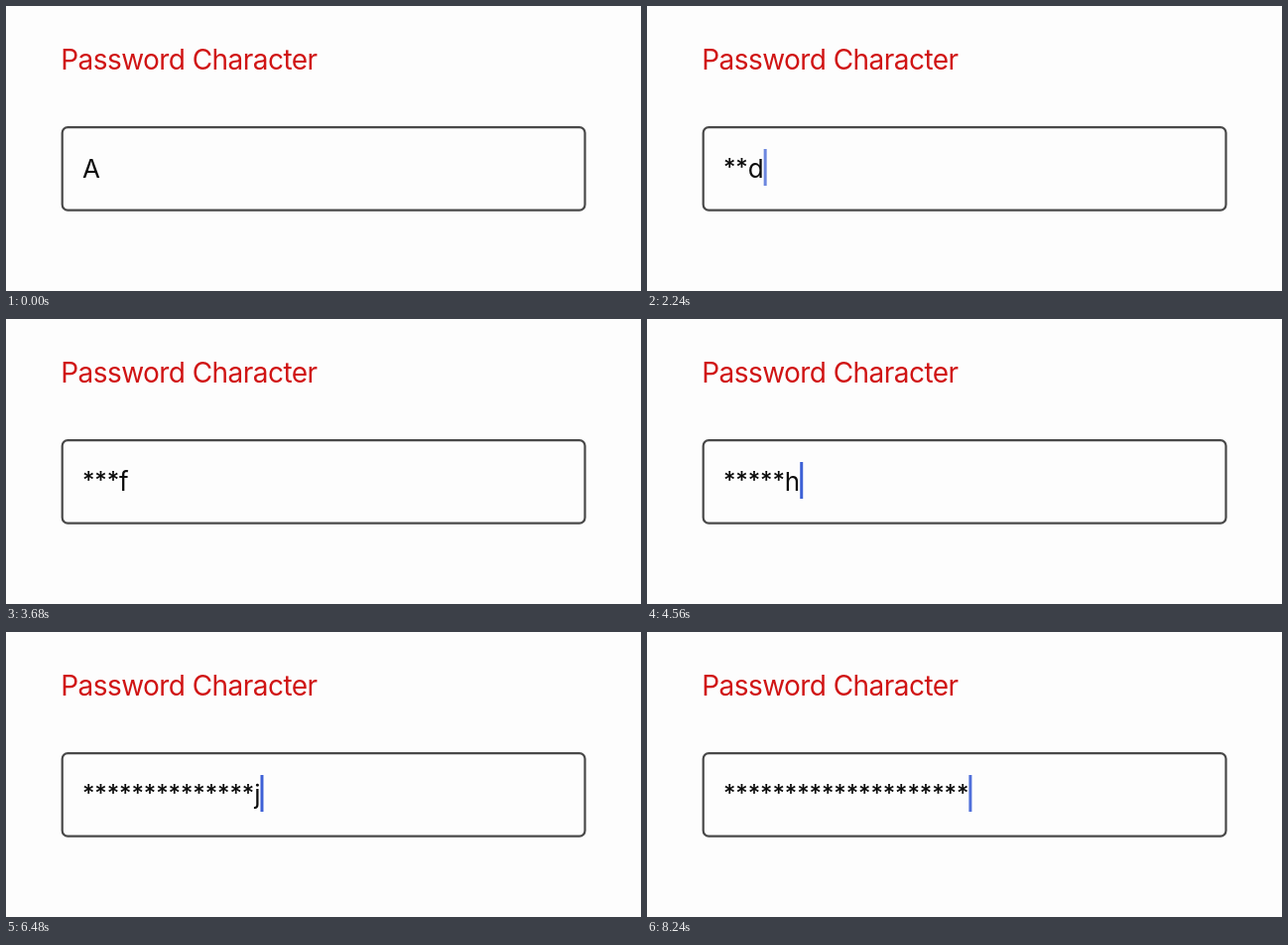
An HTML page with a canvas that plays this animation: 640x287 px, repeating every 8.32 s.

```html
<!DOCTYPE html>
<html lang="en">
<head>
<meta charset="utf-8">
<title>Password field</title>
<style>
  html, body { margin: 0; width: 100%; height: 100%; overflow: hidden; background: #fdfdfd; }
  canvas { display: block; filter: blur(0.6px); }
</style>
</head>
<body>
<canvas id="stage" width="640" height="287"></canvas>
<script>
const ctx = document.getElementById('stage').getContext('2d');
const LOOP = 8320, STEP = 80;
const SANS = 'Inter, Roboto, "Liberation Sans", sans-serif';
const LEFT = 77, PITCH = 12.37, BASE = 172.5, STAR_Y = 157.7;
const MASK_AT = 8080;

// Typed characters and the time each one appears.
const chars = 'Asdfghjkdjsdfhjsdfjd';
const times = [0, 1440, 1760, 3120, 4160, 4560, 4800, 5040, 5200, 5440,
               5680, 5760, 5920, 6160, 6400, 6560, 6720, 7040, 7280, 7440];

// Caret opacity by time since the last key press.
function caretAlpha(age) {
  if (age < 400) return 1;
  if (age < 480) return 0.88;
  if (age < 560) return 0.75;
  if (age < 800) return 0;
  if (age < 880) return 0.9;
  return 1;
}

function drawField() {
  ctx.fillStyle = '#fdfdfd';
  ctx.fillRect(0, 0, 640, 287);

  ctx.font = '28px ' + SANS;
  ctx.letterSpacing = '-0.55px';
  ctx.fillStyle = '#d01414';
  ctx.fillText('Password Character', 55.2, 64.3);
  ctx.letterSpacing = '0px';

  ctx.strokeStyle = '#484848';
  ctx.lineWidth = 2.2;
  ctx.beginPath();
  ctx.roundRect(56.7, 122.2, 526.8, 83.4, 5.5);
  ctx.stroke();
}

function drawStars(count) {
  ctx.font = '500 24px ' + SANS;
  ctx.textAlign = 'center';
  const m = ctx.measureText('*');
  const y = STAR_Y + (m.actualBoundingBoxAscent - m.actualBoundingBoxDescent) / 2;
  for (let i = 0; i < count; i++) ctx.fillText('*', LEFT + (i + 0.5) * PITCH, y);
  ctx.textAlign = 'left';
}

function draw(t) {
  drawField();

  const typed = times.filter(at => at <= t).length;
  const masked = t >= MASK_AT ? typed : typed - 1;
  const last = chars.slice(masked, typed);
  const x = LEFT + masked * PITCH;

  ctx.fillStyle = '#0c0c0c';
  drawStars(masked);
  ctx.font = '26px ' + SANS;
  ctx.fillText(last, x, BASE);

  if (t < 1200) return;
  const start = Math.max(times[typed - 1], 1200);
  ctx.globalAlpha = caretAlpha(t - start);
  ctx.fillStyle = '#3d60d6';
  ctx.fillRect(x + ctx.measureText(last).width, 144, 3, 37);
  ctx.globalAlpha = 1;
}

const begin = performance.now();
function frame() {
  const t = (performance.now() - begin) % LOOP;
  draw(Math.floor(t / STEP) * STEP);
  requestAnimationFrame(frame);
}
frame();
</script>
</body>
</html>
```
